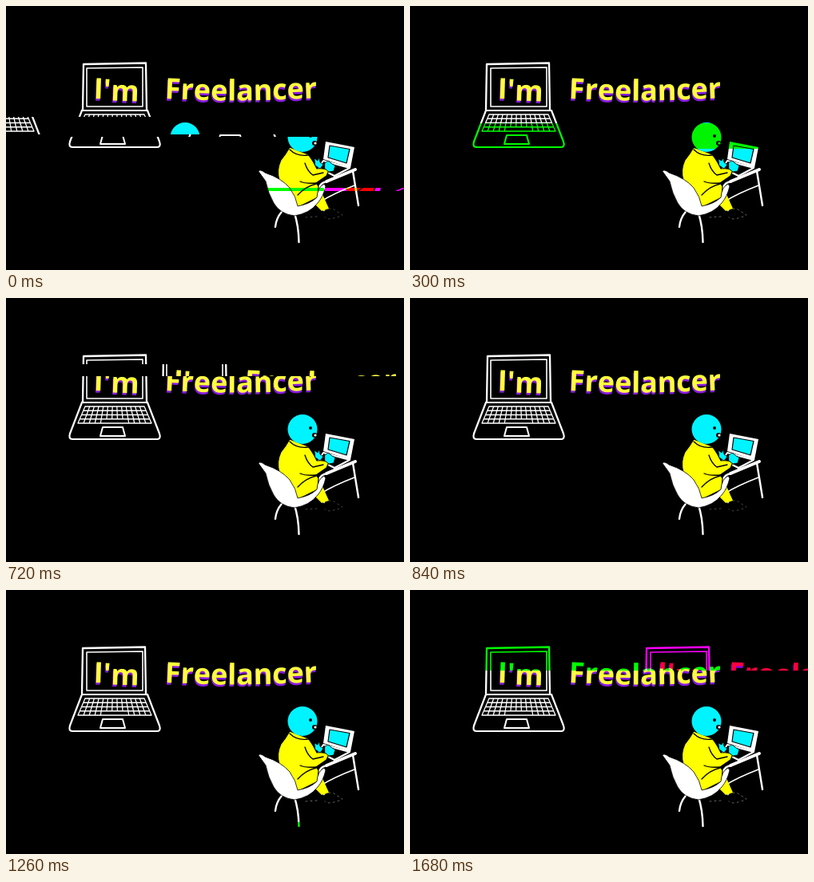
Recreate the animation shown at these times as an HTML page with a canvas. Size 498x331 px, loop 1740 ms.

```html
<!DOCTYPE html>
<html lang="en">
<head>
<meta charset="utf-8">
<title>I'm Freelancer</title>
<style>
html, body { margin: 0; width: 100%; height: 100%; overflow: hidden; background: #000; }
canvas { display: block; width: 498px; height: 331px; }
</style>
</head>
<body>
<canvas id="stage" width="498" height="331"></canvas>
<script>
const W = 498, H = 331, STEP = 60, STEPS = 29, SWEEP = 13;
const WHITE = '#fff', YELLOW = '#ffff00', CYAN = '#00f4ff', BLACK = '#000';
const TEXT = '#ffff3c', SHADOW = '#8a1be0';

function layer() {
  const c = document.createElement('canvas');
  c.width = W;
  c.height = H;
  return c;
}

function shape(g, d, fill, stroke, width = 1.5) {
  const p = new Path2D(d);
  if (fill) { g.fillStyle = fill; g.fill(p); }
  if (stroke) { g.strokeStyle = stroke; g.lineWidth = width; g.stroke(p); }
}

function dot(g, x, y, r, color) {
  g.beginPath();
  g.arc(x, y, r, 0, 7);
  g.fillStyle = color;
  g.fill();
}

function drawKeyboard(g) {
  const rows = 4, cols = 13;
  const y = k => 136 + 21 * k;
  const x = (k, u) => 99 - 9 * k + (74 + 18 * k) * u;
  let d = '';
  for (let r = 0; r <= rows; r++) {
    const k = r / rows, next = (r + 1) / rows;
    d += `M${x(k, 0)} ${y(k)}L${x(k, 1)} ${y(k)}`;
    for (let c = 0; r < rows && c <= cols; c++) {
      const spaceBar = r === rows - 1 && c > 4 && c < 9;
      if (!spaceBar) d += `M${x(k, c / cols)} ${y(k)}L${x(next, c / cols)} ${y(next)}`;
    }
  }
  shape(g, d, null, WHITE, 1.3);
}

function drawLaptop(g, pose) {
  const d = pose ? 0 : 1;
  shape(g, `M${95 + d} 130L${96 + d} 73L${174 + d} 71.5L${175 + d} 130`, null, WHITE, 2.3);
  shape(g, 'M101 126V78L171 77V126Z', null, WHITE, 1.6);
  shape(g, 'M95 131H177', null, WHITE, 2);
  shape(g, 'M95 131L80 170Q78 177 83 177H190Q194 176 192 170L177 131', null, WHITE, 2.2);
  shape(g, 'M121 162H146L149 173H118Z', null, WHITE, 2);
  drawKeyboard(g);
}

function drawWord(g, word, x, baseline, tilt) {
  g.font = 'bold 36px "Open Sans", "Noto Sans", sans-serif';
  [...word].forEach((ch, i) => {
    const u = i / (word.length - 1);
    g.save();
    g.translate(x, baseline(u));
    g.rotate(tilt(u));
    g.fillStyle = SHADOW;
    g.fillText(ch, -0.6, 2.6);
    g.fillStyle = TEXT;
    g.fillText(ch, 0, 0);
    g.restore();
    x += g.measureText(ch).width;
  });
}

function drawDesk(g) {
  // top and legs
  shape(g, 'M437 205L401 220', null, WHITE, 4);
  shape(g, 'M434 207Q437 225 441 250', null, WHITE, 2.4);
  shape(g, 'M402 220Q390 222 391 235L398 256', null, WHITE, 2.4);
  shape(g, 'M394 245Q410 235 436 225', null, WHITE, 1.8);
  // small computer
  shape(g, 'M397 194L430 203L411 213L391 203Z', BLACK, WHITE, 2);
  shape(g, 'M400 170L436 177L431 203L397 192Z', WHITE);
  shape(g, 'M405 175L430 179.5L426 197L403 190Z', CYAN, BLACK, 1.2);
}

function drawShoe(g, pose) {
  g.save();
  g.setLineDash([2, 4]);
  shape(g, 'M398 256Q408 252 413 257L421 262Q414 266 404 267L399 265M375 265L389 264',
    null, pose ? '#666' : '#444', 1);
  g.restore();
}

function drawPerson(g, pose) {
  drawShoe(g, pose);

  // chair legs
  shape(g, 'M345 258Q338 266 337 277M361 260Q366 275 366.5 296', null, WHITE, 2.4);

  // lower leg, then body and sleeve
  shape(g, 'M386 232L396 236L404 254L395 257L384 246Z', YELLOW);
  shape(g, `M355 177Q350 186 344 193Q338 206 342 219L364 253L390 240L391 226
    L388 222L401 213L404 206Q397 203 389 204Q384 193 378 186Z`, YELLOW, BLACK, 1.2);
  shape(g, `M374 197Q377 207 384 212L397 209M388 222Q375 223 368 220
    M365 237Q375 226 388 223M355 180Q364 189 378 187`, null, BLACK, 1.3);

  // chair shell
  shape(g, `M316 207Q318 204 324 209Q345 216 355 228Q363 239 365 251
    Q381 248 389 240Q390 227 398 223L400 226Q397 239 390 247Q380 260 361 263
    Q343 261 335 247Q328 235 325 220Z`, WHITE, BLACK, 0.8);

  // head
  dot(g, 371, 164.5, 18.5, CYAN);
  dot(g, 381, 163, 1.9, BLACK);
  dot(g, 386, 172, 3, BLACK);
  dot(g, 387, 172, 1.6, WHITE);
}

function drawHands(g, pose) {
  const d = pose ? 1 : 0;
  shape(g, `M386 ${191 + d}L390 194L392 190L393 196L397 199L393 204L387 200Z
    M399 ${197 - d}L403 194L408 198L412 200L410 207L404 208L399 204Z`, CYAN, BLACK, 0.8);
}

function drawScene(pose) {
  const c = layer(), g = c.getContext('2d');
  g.fillStyle = BLACK;
  g.fillRect(0, 0, W, H);
  g.lineJoin = g.lineCap = 'round';
  drawLaptop(g, pose);
  drawWord(g, "I'm", 109.5, u => 116 + 2.5 * u, () => 0.03);
  drawWord(g, 'Freelancer', 198.5,
    u => 116 + 2.5 * Math.sin(Math.PI * u), u => 0.04 * Math.cos(Math.PI * u));
  drawDesk(g);
  drawPerson(g, pose);
  drawHands(g, pose);
  return c;
}

function tinted(src, color) {
  const c = layer(), g = c.getContext('2d');
  g.drawImage(src, 0, 0);
  g.globalCompositeOperation = 'multiply';
  g.fillStyle = color;
  g.fillRect(0, 0, W, H);
  return c;
}

const ctx = document.getElementById('stage').getContext('2d');
const poses = [0, 1].map(pose => {
  const full = drawScene(pose);
  return { green: tinted(full, '#0f0'), magenta: tinted(full, '#f0f'), full };
});

function band(art, top, height, greenShift, magentaShift) {
  ctx.save();
  ctx.beginPath();
  ctx.rect(0, top, W, height);
  ctx.clip();
  ctx.fillStyle = BLACK;
  ctx.fillRect(0, top, W, height);
  ctx.globalCompositeOperation = 'lighter';
  ctx.drawImage(art.green, greenShift, 0);
  ctx.drawImage(art.magenta, magentaShift, 0);
  ctx.restore();
}

// Colours part in bands that drop ever faster until they leave the stage.
function splitColours(art, k) {
  const j = (k - 3) / 2;
  band(art, 69 + 45 * j + 33 * j * j, 32, 0, 200 * (k - 2));
}

// A strip of the picture jumps sideways; later ones throw back an echo.
function slip(art, k) {
  const top = Math.round(70 + 13 * k - k * k / 4), height = 13 + 2 * k;
  const early = k < 3, shift = early ? 100 : -147;
  band(art, top, height, shift, shift);
  if (early) return;
  band(art, top + height - 3, 3, -shift, -shift);
  band(art, top + 89, 4, 0, 70);
}

function render(step) {
  // The line drawing flickers 15 times per loop.
  const art = poses[step * 15 % STEPS > 13 ? 1 : 0];
  ctx.drawImage(art.full, 0, 0);
  const k = (step * 5 + 6) % SWEEP;
  if (k > 2 && k % 2) splitColours(art, k);
  else slip(art, k);
}

const start = performance.now();
function tick() {
  const elapsed = performance.now() - start;
  render(Math.floor(elapsed / STEP) % STEPS);
  requestAnimationFrame(tick);
}
tick();
</script>
</body>
</html>
```
